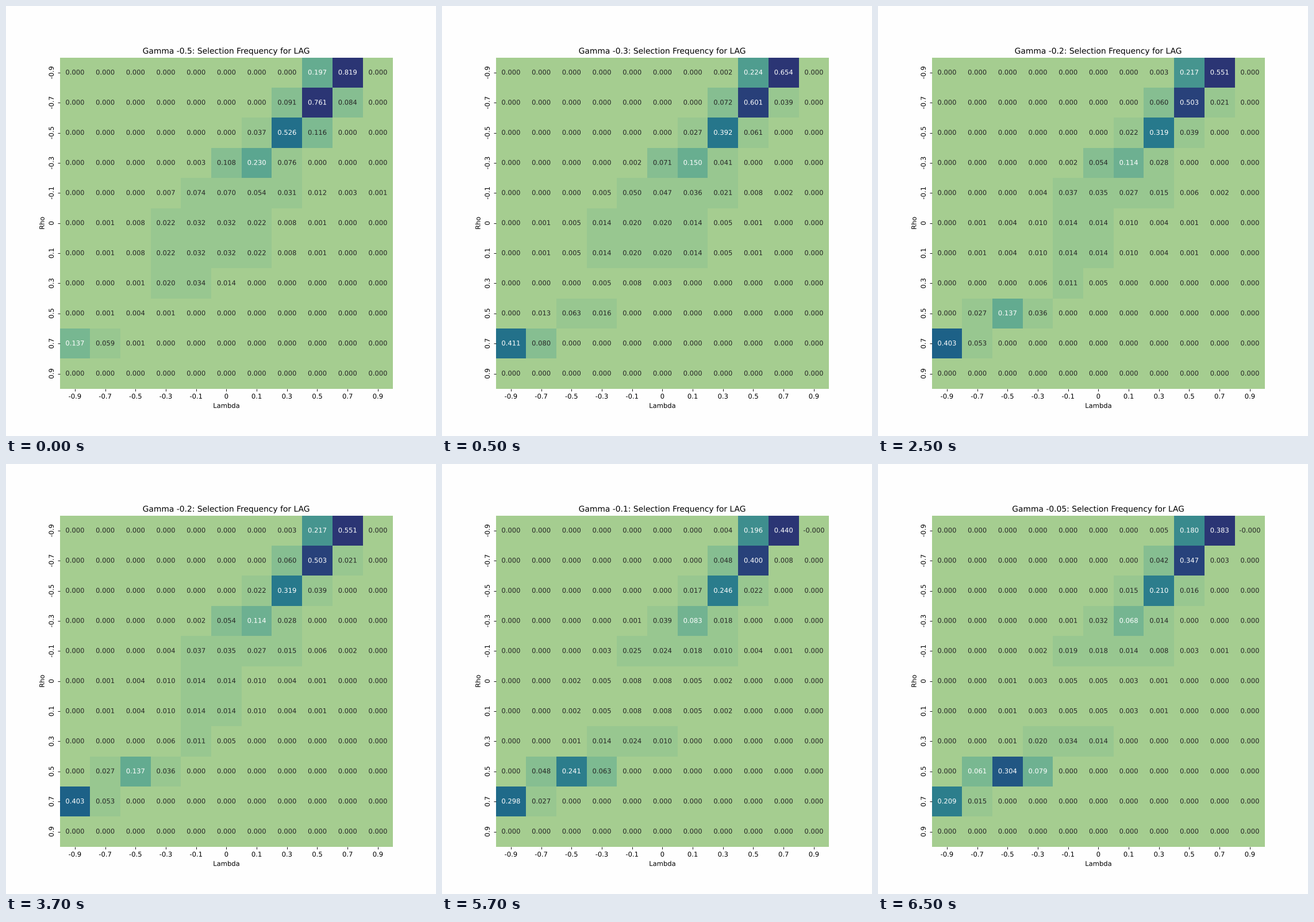
Recreate the animation shown at these times as a matplotlib script. Size 748 by 748 pixels, loop 8000 ms.

```python
import numpy as np
import matplotlib.pyplot as plt
from matplotlib.animation import FuncAnimation
from matplotlib.colors import LinearSegmentedColormap
from matplotlib.patheffects import Normal
from matplotlib.text import Text

STAGE = 748
GAMMAS = [-0.5, -0.3, -0.2, -0.1, -0.05]
LEVELS = ["-0.9", "-0.7", "-0.5", "-0.3", "-0.1", "0", "0.1", "0.3", "0.5", "0.7", "0.9"]
SIZE = len(LEVELS)
CMAP = LinearSegmentedColormap.from_list("sea", [
    "#a5cd90", "#7dba91", "#59a590", "#40908e",
    "#287a8c", "#1c6488", "#254b7f", "#2c3172"])


def bump(center, height, left, right):
    """One row peaking at center; left and right are the ratios one cell away."""
    d = np.arange(SIZE) - center
    return height * np.where(d < 0, left, right) ** np.abs(d) ** 2.5


def frequencies(gamma):
    """Selection frequency table: a fading upper ridge and a growing lower one."""
    s = (gamma - GAMMAS[0]) / (GAMMAS[-1] - GAMMAS[0])
    table = np.zeros((SIZE, SIZE))

    # Upper ridge along the antidiagonal
    peak = 0.819 - 0.436 * s ** 1.2
    for r, left in enumerate([0.24 + 0.23 * s, 0.12, 0.07, 0.47]):
        height = peak * np.exp(-(0.073 + 0.026 * s) * r ** 2.6)
        right = 0.11 * r * (1 - s * (1.2 - 0.27 * r))
        table[r] = bump(9 - r, height, left, right)

    # Low plateau in the middle
    table[4] = bump(4, 0.074 - 0.055 * s, 0.1, 0.945)
    table[5:7] = bump(4.5, 0.033 * (1 - 0.86 * s), 0.87, 0.87)
    table[7] = bump(3.9, 0.008 + 0.026 * (1 - 2 * s) ** 2, 0.5, 0.5)

    # Lower ridge
    table[8] = bump(2, 0.004 + 0.3 * s ** 2, 0.2, 0.26)
    table[9] = bump(0, 0.137 + 1.052 * s - 0.98 * s ** 2, 0, 0.43 * 0.17 ** s)
    return table


def banded(t):
    """Merge the palest and darkest shades into flat bands."""
    return np.select([t < 0.0195, t < 0.0975, t < 0.14, t > 0.92],
                     [0.0, 0.05, 0.11, 0.98], t)


plt.rcParams.update({"font.family": "DejaVu Sans", "text.hinting": "none"})
fig, ax = plt.subplots(figsize=(9, 9), dpi=STAGE / 9, facecolor="#fefefe")
mesh = ax.pcolormesh(np.zeros((SIZE, SIZE)), cmap=CMAP, vmin=0, vmax=1)
ax.set(xlim=(0, SIZE), ylim=(SIZE, 0), xlabel="Lambda", ylabel="Rho")
ax.spines[:].set_visible(False)
centers = np.arange(SIZE) + 0.5
ax.set_xticks(centers, LEVELS)
ax.set_yticks(centers, LEVELS, rotation=90, va="center")
title = ax.set_title("")
labels = [ax.text(x, y, "", ha="center", va="center") for y in centers for x in centers]

# Drawn as outlines, text keeps its exact subpixel position
for text in fig.findobj(Text):
    text.set_path_effects([Normal()])


def draw(n):
    gamma = GAMMAS[(n + 3) // 4]
    table = frequencies(gamma)
    share = table / table.max()
    mesh.set_array(banded(share))
    title.set_text(f"Gamma {gamma}: Selection Frequency for LAG")
    for label, value, t in zip(labels, table.flat, share.flat):
        label.set_text(f"{value:.3f}")
        label.set_color("white" if t > 0.155 else "0.15")
    return [mesh, title, *labels]


anim = FuncAnimation(fig, draw, frames=16, interval=500, repeat=True, repeat_delay=0)
plt.show()
```
